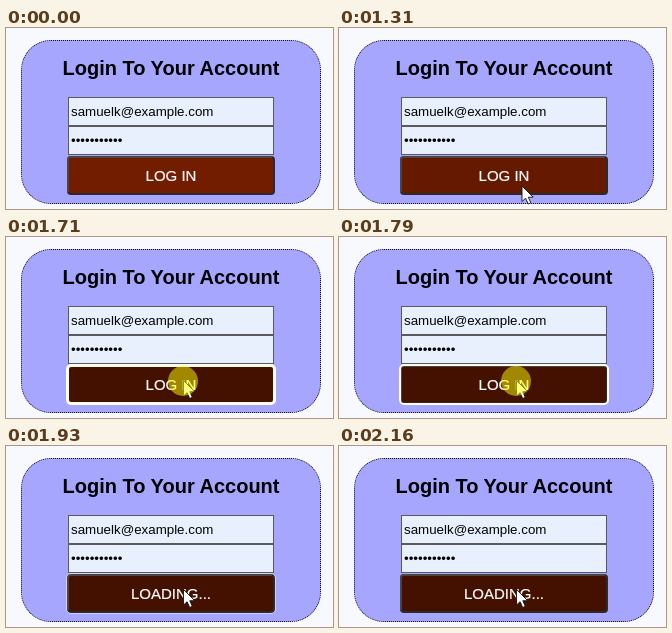
These frames come from a looping animation (327 by 181 pixels, 2860 ms). An HTML page:

```html
<!DOCTYPE html>
<html lang="en">
<head>
<meta charset="utf-8">
<title>Login form</title>
<style>
  html, body { margin: 0; width: 100%; height: 100%; overflow: hidden; background: #f8f8ff; }
  .card {
    position: absolute; left: 15px; top: 12px; width: 300px; height: 164px;
    box-sizing: border-box; border: 1px dotted #111; border-radius: 30px; background: #a6a6ff;
  }
  svg { position: absolute; left: 0; top: 0; }
  text { font-family: Arial, "Liberation Sans", sans-serif; }
  .title { font-size: 20px; font-weight: bold; text-anchor: middle; }
  .value { font-size: 13.333px; }
  .field { fill: #e8f0fe; stroke: #5a5a5a; }
  .label { font-size: 15px; fill: #fff; stroke: #fff; stroke-width: .2px; text-anchor: middle; }
</style>
</head>
<body>
<div class="card"></div>
<svg width="327" height="181" viewBox="0 0 327 181">
  <text class="title" x="165" y="47">Login To Your Account</text>
  <rect class="field" x="62.5" y="69.5" width="205" height="28"/>
  <rect class="field" x="62.5" y="98.5" width="205" height="28"/>
  <text class="value" x="65" y="88">samuelk@example.com</text>
  <text class="value" x="65" y="117">•••••••••••</text>

  <rect x="61" y="128" width="208" height="39" rx="4" fill="#2d2a2a"/>
  <path d="M62 164V132Q62 129 65 129H266" fill="none" stroke="#4a4646" stroke-width="2"/>
  <rect id="face" x="63" y="130" width="204" height="35" rx="2"/>
  <rect id="ring" fill="none" stroke="#fffdec"/>
  <text id="label" class="label" x="165" y="153"></text>
  <path id="cursor" d="M0 0V15.5L3.6 12.2L6.2 18L8.8 16.8L6.3 11.2H11.2Z"
        fill="#fff" stroke="#111" stroke-width=".9"/>
  <circle id="click" cx="177" cy="144" r="15" fill="#ff0" fill-opacity=".5"/>
</svg>
<script>
  const LOOP = 2860;
  const REST = [114, 28, 0], HOVER = [68, 17, 0];

  // time, cursor x, cursor y, hover amount
  const moves = [
    [1150, 187, 174, 0], [1240, 186, 167, 0], [1310, 183, 158, .3],
    [1390, 180, 149, .7], [1460, 178, 145, .9], [1540, 177.5, 143.5, 1]
  ];
  // time, ring width, ring opacity
  const focus = [
    [1710, 3, 1], [1790, 2, 1], [1850, 1, .9],
    [1930, 1, .5], [2010, 1, .15], [2080, 1, .08], [2160, 0, 0]
  ];

  const $ = id => document.getElementById(id);
  const ring = $("ring"), face = $("face");
  const label = $("label"), click = $("click"), cursor = $("cursor");

  const stepAt = (table, t) => table.filter(row => row[0] <= t).pop();
  const show = (el, on) => el.setAttribute("visibility", on ? "visible" : "hidden");
  const set = (el, attrs) => {
    for (const name in attrs) el.setAttribute(name, attrs[name]);
  };

  function draw(t) {
    const [, x, y, hover] = stepAt(moves, t) || [0, 0, 0, 0];
    const [, width, opacity] = stepAt(focus, t) || [0, 0, 0];
    const color = REST.map((c, i) => Math.round(c + (HOVER[i] - c) * hover));

    show(cursor, t >= 1150);
    set(cursor, { transform: `translate(${x} ${y})` });
    set(face, { fill: `rgb(${color})` });

    // The ring keeps its outer edge and thins from the inside.
    set(ring, {
      x: 60 + width / 2, y: 127 + width / 2,
      width: 210 - width, height: 41 - width, rx: 5 - width / 2,
      "stroke-width": width, "stroke-opacity": opacity
    });

    show(click, t >= 1710 && t < 1930);
    const word = t >= 1930 ? "LOADING..." : "LOG IN";
    if (label.textContent !== word) label.textContent = word;
  }

  const start = performance.now();
  function tick() {
    draw((performance.now() - start) % LOOP);
    requestAnimationFrame(tick);
  }
  draw(0);
  requestAnimationFrame(tick);
</script>
</body>
</html>
```
